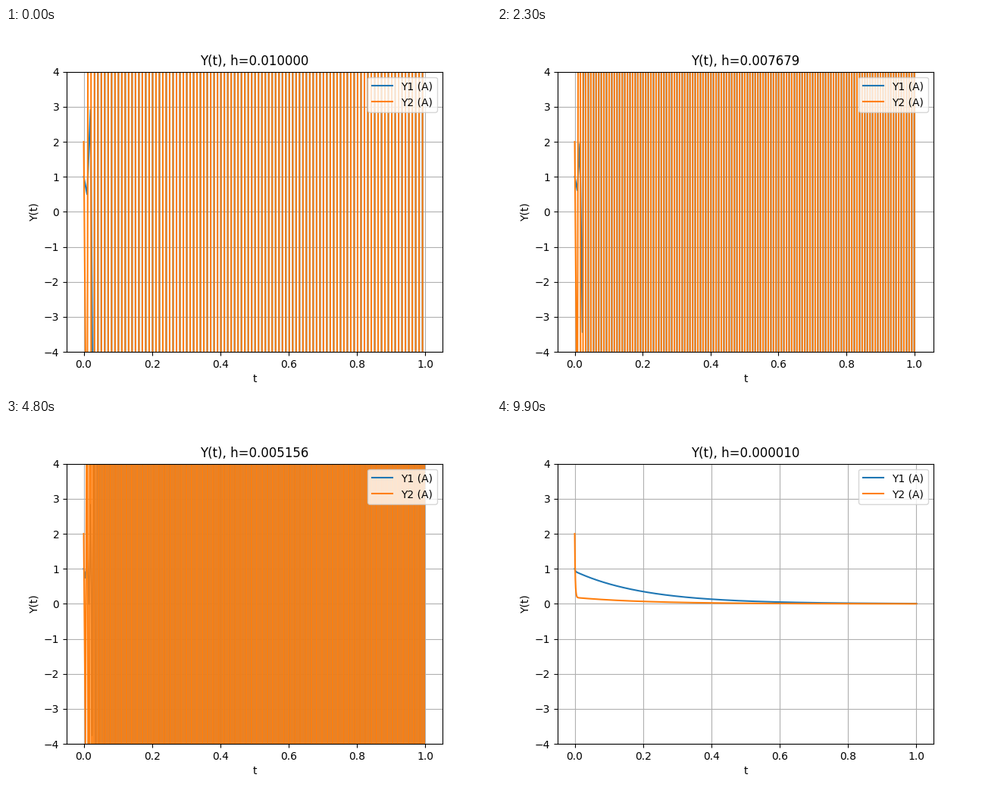
These frames come from a looping animation (640 by 480 pixels, 10000 ms). A matplotlib script:

```python
import numpy as np
import matplotlib.pyplot as plt
from matplotlib.animation import FuncAnimation

FRAMES = 100
STEPS = np.linspace(0.01, 1e-5, FRAMES)

# Stiff linear system Y' = A Y, integrated with explicit Euler
A = np.array([[0.0, -25.0], [125.0, -645.0]])
Y0 = np.array([1.0, 2.0])
LAM, VEC = np.linalg.eig(A)
COEF = np.linalg.solve(VEC, Y0)


def euler(h):
    """Euler iterates in the eigenbasis: each mode scales by 1 + h*lambda."""
    n = np.arange(int(np.ceil(1 / h - 1e-9)) + 1)
    modes = COEF[:, None] * (1 + h * LAM)[:, None] ** n
    return n * h, VEC @ modes


fig, ax = plt.subplots(figsize=(6.4, 4.8), dpi=100)
lines = [ax.plot([], [], label=name)[0] for name in ("Y1 (A)", "Y2 (A)")]
title = ax.set_title("")
ax.set_xlabel("t")
ax.set_ylabel("Y(t)")
ax.set_ylim(-4, 4)
ax.grid(True)
ax.legend(loc="upper right")


def update(i):
    h = STEPS[i]
    t, ys = euler(h)
    for line, y in zip(lines, ys):
        line.set_data(t, y)
    ax.set_xlim(-0.05 * t[-1], 1.05 * t[-1])
    title.set_text(f"Y(t), h={h:.6f}")
    return [*lines, title]


anim = FuncAnimation(fig, update, frames=FRAMES, interval=100,
                     repeat=True, repeat_delay=0)
plt.show()
```
